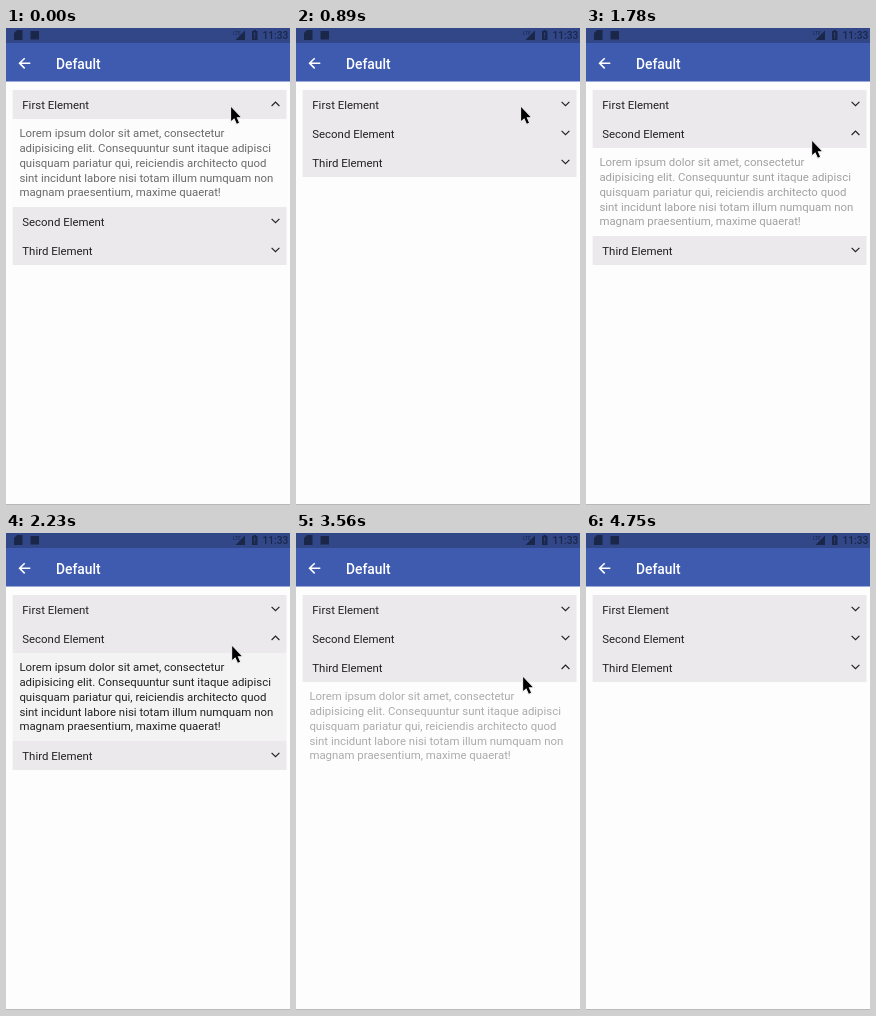
Animation of 284x477 px, one loop 5650 ms. Source, as an HTML page:

```html
<!DOCTYPE html>
<html lang="en">
<head>
<meta charset="utf-8">
<title>Accordion</title>
<style>
  html, body { margin: 0; width: 100%; height: 100%; overflow: hidden; background: #fdfdfd; }
  svg { display: block; width: 284px; height: 477px; }
  text { font: 11.42px Roboto, sans-serif; fill: #222; }
  .title { font-size: 13.8px; font-weight: 500; fill: #fff; }
  .dark, .dark text { fill: #1b2749; }
  .chevron { fill: none; stroke: #222; stroke-width: 1.15; }
  #cursor { stroke: #fff; stroke-width: 1.6; paint-order: stroke; filter: drop-shadow(.7px .7px .6px #0005); }
</style>
</head>
<body>
<svg viewBox="0 0 284 477">
  <rect width="284" height="477" fill="#fdfdfd"/>
  <rect y="476" width="284" height="1" fill="#b9b9b9"/>
  <rect width="284" height="53.5" fill="#3f5bb0"/>
  <rect width="284" height="15" fill="#314788"/>
  <g class="dark">
    <path d="M11 2h5.5v10h-8.5v-7z"/>
    <rect x="24.5" y="3" width="8.5" height="8.5"/>
    <text x="227" y="7" style="font-size:5px">LTE</text>
    <path d="M239 2.5v9.5h-9.5z"/>
    <path d="M247.5 2h2.5v1h1.5v9h-5.5v-9h1.5z"/>
    <path d="M248.7 4.5v3.5m0 1v1.2" stroke="#314788"/>
    <text x="256.5" y="11" style="font-size:10.2px;font-weight:500">11:33</text>
  </g>
  <path d="M24.3 35.3H13.8M18.7 30.2L13.6 35.3L18.7 40.4" fill="none" stroke="#fff" stroke-width="1.6"/>
  <text class="title" x="50" y="40.7">Default</text>
  <g id="list"></g>
  <g id="body">
    <rect id="panel" x="6.7" width="273.8" height="88" fill="#f3f3f3"/>
    <g id="copy"></g>
  </g>
  <path id="cursor" d="M.8 1V15L4 12.200L6.500 17.700L8.700 16.700L6.300 11.300H10.500Z"/>
</svg>
<script>
const $ = id => document.getElementById(id);
const LOOP = 5650, TICK = 148.2;
const TOP = 62, ROW = 29, BODY = 88;
const names = ['First', 'Second', 'Third'];
const lines = [
  'Lorem ipsum dolor sit amet, consectetur',
  'adipisicing elit. Consequuntur sunt itaque adipisci',
  'quisquam pariatur qui, reiciendis architecto quod',
  'sint incidunt labore nisi totam illum numquam non',
  'magnam praesentium, maxime quaerat!'
];

$('list').innerHTML = names.map(name => `<g>
  <rect x="6.7" width="273.8" height="${ROW}" fill="#ebe9eb"/>
  <text x="16.3" y="18.5">${name} Element</text>
  <path class="chevron"/></g>`).join('');
$('copy').innerHTML = lines.map((line, i) =>
  `<text x="13.4" y="${18.3 + i * 14.75}">${line}</text>`).join('');
const rows = [...$('list').children];

const place = (el, x, y) => el.setAttribute('transform', `translate(${x} ${y})`);

// Smooth step from 0 to 1 between two ticks
function glide(tick, start, end) {
  const p = Math.min(1, Math.max(0, (tick - start) / (end - start)));
  return p * p * (3 - 2 * p);
}

function draw(now) {
  // The screen refreshes once per tick; each section takes twelve, open for the first six
  const tick = Math.floor(now % LOOP / TICK);
  const turn = Math.floor(tick / 12), age = tick % 12;
  const open = turn < names.length && age < 6 ? turn : -1;

  rows.forEach((row, i) => {
    place(row, 0, TOP + i * ROW + (open >= 0 && i > open ? BODY : 0));
    row.lastElementChild.setAttribute('d',
      i === open ? 'M265.6 16l3.9-3.9 3.9 3.9' : 'M265.6 11.8l3.9 3.9 3.9-3.9');
  });

  // Earlier sections are further into their fade when first seen
  const lead = 1.5 + 1.5 / (turn + 1) ** 2;
  const alpha = Math.min(1, (age + lead) / 4.5);
  $('body').style.display = open < 0 ? 'none' : '';
  place($('body'), 0, TOP + (open + 1) * ROW);
  $('copy').setAttribute('opacity', alpha);
  $('panel').setAttribute('opacity', alpha ** 4);

  const drop = 34 * glide(tick, 8, 9.45) + 31 * glide(tick, 19.8, 21.9);
  $('cursor').style.display = tick < 32 ? '' : 'none';
  place($('cursor'), 224.3 + drop / 32, 78 + drop);
  requestAnimationFrame(draw);
}
draw(performance.now());
</script>
</body>
</html>
```
